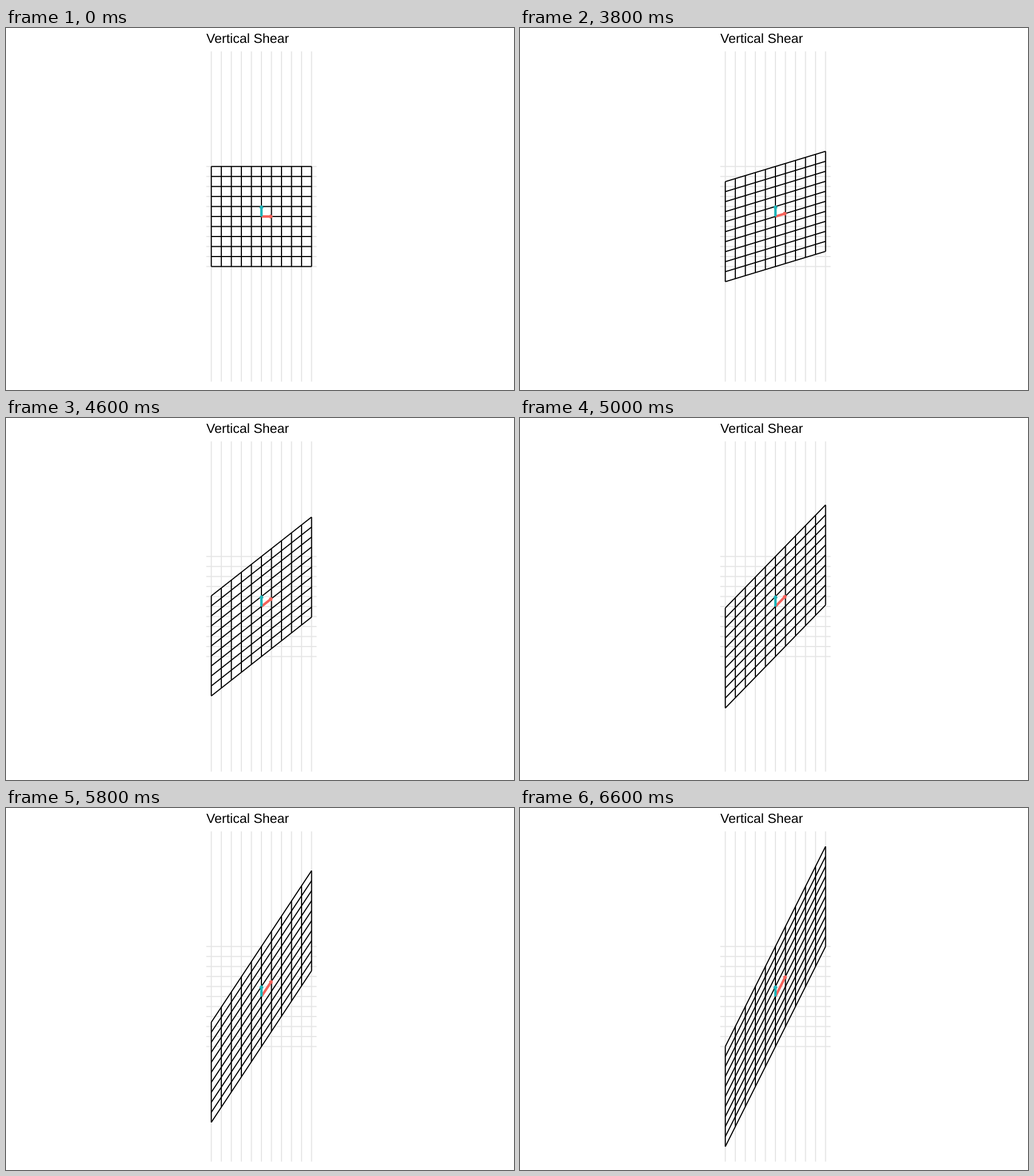
Write a matplotlib script that moves like this. It is 885 by 632 pixels and loops after 10 s.

```python
import numpy as np
import matplotlib.pyplot as plt
from matplotlib.animation import FuncAnimation
from matplotlib.collections import LineCollection

WIDTH, HEIGHT, DPI = 885, 632, 64
PT = 72 / DPI                      # points per pixel
CX, CY, UNIT = 445.0, 329.1, 17.47  # grid origin and cell size in pixels
FRAMES, INTERVAL = 100, 100
SHEAR_START, SHEAR_STEPS, MAX_SHEAR = 33, 33, 2.0

GRID_GREY, RED, TEAL = "#E6E6E6", "#F6625A", "#1FB4B8"
LINE, ARROW_LINE, HEAD = 1.9, 4.3, 4.0

plt.rcParams["text.hinting"] = "none"
fig = plt.figure(figsize=(WIDTH / DPI, HEIGHT / DPI), dpi=DPI, facecolor="white")
ax = fig.add_axes([0, 0, 1, 1])
ax.set_xlim(0, WIDTH)
ax.set_ylim(HEIGHT, 0)
ax.axis("off")


def to_pixels(points):
    """Map grid units (y up) to stage pixels (y down)."""
    return np.asarray(points, float) * [UNIT, -UNIT] + [CX, CY]


def shear(points, amount):
    points = np.array(points, float)
    points[..., 1] += amount * points[..., 0]
    return points


def lattice(half_w, half_h):
    """Segments at -5..5 in both directions with the given half extents."""
    ticks = range(-5, 6)
    rows = [[(-half_w, t), (half_w, t)] for t in ticks]
    columns = [[(t, -half_h), (t, half_h)] for t in ticks]
    return np.array(rows + columns, float)


def add_lines(segments, color, zorder):
    lines = LineCollection(to_pixels(segments), colors=color, linewidths=LINE * PT,
                           capstyle="butt", zorder=zorder)
    lines.set_snap(False)
    return ax.add_collection(lines, autolim=False)


def add_arrow(color, zorder):
    style = dict(color=color, lw=ARROW_LINE * PT, zorder=zorder, snap=False,
                 solid_capstyle="butt", solid_joinstyle="round")
    return [ax.plot([], [], **style)[0] for _ in range(2)]


def set_arrow(arrow, vector):
    start, tip = to_pixels([(0, 0), vector])
    angle = np.arctan2(*(start - tip)[::-1])
    barbs = [tip + HEAD * np.array([np.cos(a), np.sin(a)])
             for a in (angle - np.pi / 6, angle + np.pi / 6)]
    shaft, head = arrow
    shaft.set_data(*np.array([start, tip]).T)
    head.set_data(*np.array([barbs[0], tip, barbs[1]]).T)


add_lines(lattice(5.5, 16.5), GRID_GREY, 1)
cells = lattice(5, 5)
grid = add_lines(cells, "black", 2)
red_arrow = add_arrow(RED, 3)
teal_arrow = add_arrow(TEAL, 4)
ax.text(348.9, 26.2, "Vertical Shear", family="Liberation Sans",
        fontsize=23.1 * PT, color="black", ha="left", va="baseline")


def update(frame):
    step = np.clip(frame - SHEAR_START, 0, SHEAR_STEPS)
    amount = MAX_SHEAR * step / SHEAR_STEPS
    grid.set_segments(to_pixels(shear(cells, amount)))
    set_arrow(red_arrow, shear((1, 0), amount))
    set_arrow(teal_arrow, shear((0, 1), amount))
    return [grid, *red_arrow, *teal_arrow]


anim = FuncAnimation(fig, update, frames=FRAMES, interval=INTERVAL,
                     repeat=True, repeat_delay=0, blit=False)
plt.show()
```
